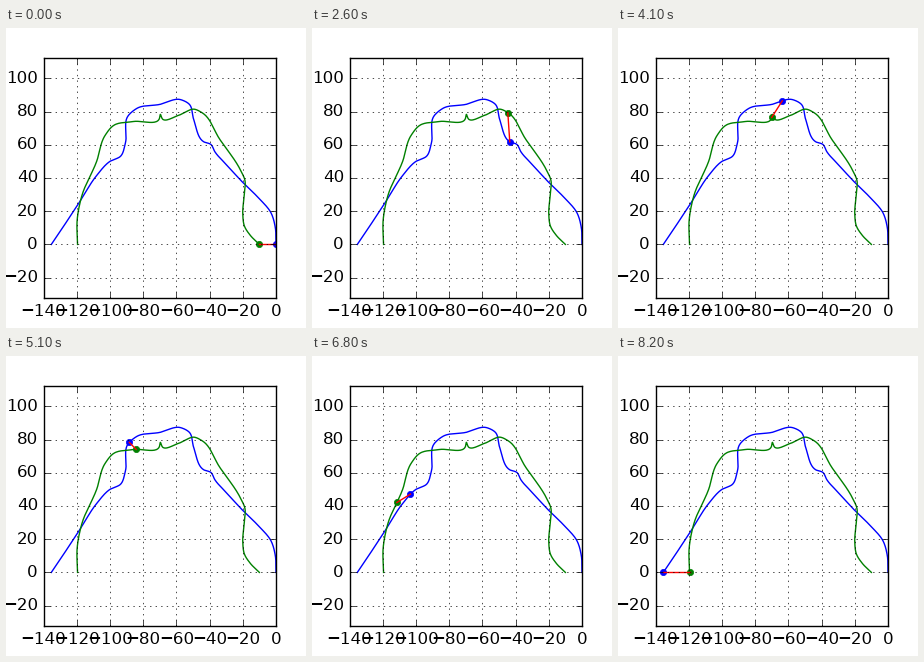
These frames come from a looping animation (300x300 px, 10 s). A matplotlib script:

```python
import numpy as np
import matplotlib.pyplot as plt
from matplotlib.animation import FuncAnimation

plt.style.use("classic")
plt.rcParams.update({"font.family": "DejaVu Sans", "text.hinting": "native",
                     "xtick.major.pad": 3.5})

FRAMES, LAST_STEP = 100, 82  # the final pose is held to the end of the loop


def arc_length(points):
    return np.r_[0, np.cumsum(np.hypot(*np.diff(points, axis=0).T))]


def smooth(*points, samples=24):
    """Cubic Hermite curve through the points, chord-length parameterised."""
    p = np.array(points, float)
    t = arc_length(p)
    slope = np.gradient(p, t, axis=0)
    u = np.linspace(0, 1, samples, endpoint=False)[:, None]
    pieces = []
    for i, h in enumerate(np.diff(t)):
        pieces.append((1 + 2 * u) * (1 - u) ** 2 * p[i]
                      + u * (1 - u) ** 2 * h * slope[i]
                      + u ** 2 * (3 - 2 * u) * p[i + 1]
                      + u ** 2 * (u - 1) * h * slope[i + 1])
    return np.vstack(pieces + [p[-1:]])


def walk(curve, steps, stops):
    """Position at each step, at even speed along the curve between stops."""
    length = arc_length(curve)
    nearest = [np.hypot(*(curve - stop).T).argmin() for stop in stops]
    s = np.interp(np.arange(LAST_STEP + 1), [0, *steps, LAST_STEP],
                  [0, *length[nearest], length[-1]])
    return np.column_stack([np.interp(s, length, axis) for axis in curve.T])


blue = smooth((0, 0), (-0.4, 10), (-3, 19), (-9.5, 27), (-19, 36.3),
              (-30, 48.2), (-36.8, 55.8), (-39.2, 60.2), (-43.5, 61.8),
              (-49.5, 75), (-52.3, 84.5), (-57.5, 87.2), (-70, 84.3),
              (-84, 81.8), (-89, 77.5), (-90.7, 61), (-93.5, 53.2),
              (-100, 50), (-108, 41.5), (-118, 26), (-125, 15.3), (-135.3, 0))
green = smooth((-10, 0), (-15.5, 5.5), (-19, 11), (-20, 18), (-19.1, 30),
               (-18.8, 39), (-21, 44), (-34, 63.5), (-44.5, 79.3),
               (-49, 81.4), (-58, 78), (-68.5, 75.7), (-69.6, 78.3),
               (-70.2, 75.8), (-86, 74), (-98, 71.5), (-103, 65.5),
               (-108, 50), (-117, 29), (-119.7, 15), (-119.5, 0))

steps = [13, 26, 41, 60, 68]
blue_walk = walk(blue, steps, [
    (-30, 48.2), (-43.7, 62), (-63.7, 86.2), (-92, 55), (-103.5, 47.3)])
green_walk = walk(green, steps, [
    (-18.7, 38.5), (-44.5, 79.5), (-69.7, 76.5), (-98, 71.3), (-111.2, 41.5)])

fig = plt.figure(figsize=(3, 3), dpi=100, facecolor="white")
ax = fig.add_axes([0.125, 0.1, 0.775, 0.8])
ax.plot(*blue.T, "b-")
ax.plot(*green.T, "g-")
blue_dot, = ax.plot([], [], "bo", markersize=4.5, markeredgecolor="b")
green_dot, = ax.plot([], [], "go", markersize=4.5, markeredgecolor="g")
leash, = ax.plot([], [], "r-")
ax.grid(True)
ax.set_xlim(-140, 0)
half_height = 70 * 240 / 232.5  # equal scale on both axes
ax.set_ylim(40 - half_height, 40 + half_height)
ax.set_xticks(range(-140, 1, 20))
ax.set_yticks(range(-20, 101, 20))


def update(frame):
    step = min(frame, LAST_STEP)
    b, g = blue_walk[step], green_walk[step]
    blue_dot.set_data([b[0]], [b[1]])
    green_dot.set_data([g[0]], [g[1]])
    leash.set_data([b[0], g[0]], [b[1], g[1]])
    return blue_dot, green_dot, leash


anim = FuncAnimation(fig, update, frames=FRAMES, interval=100,
                     repeat=True, repeat_delay=0)
plt.show()
```
